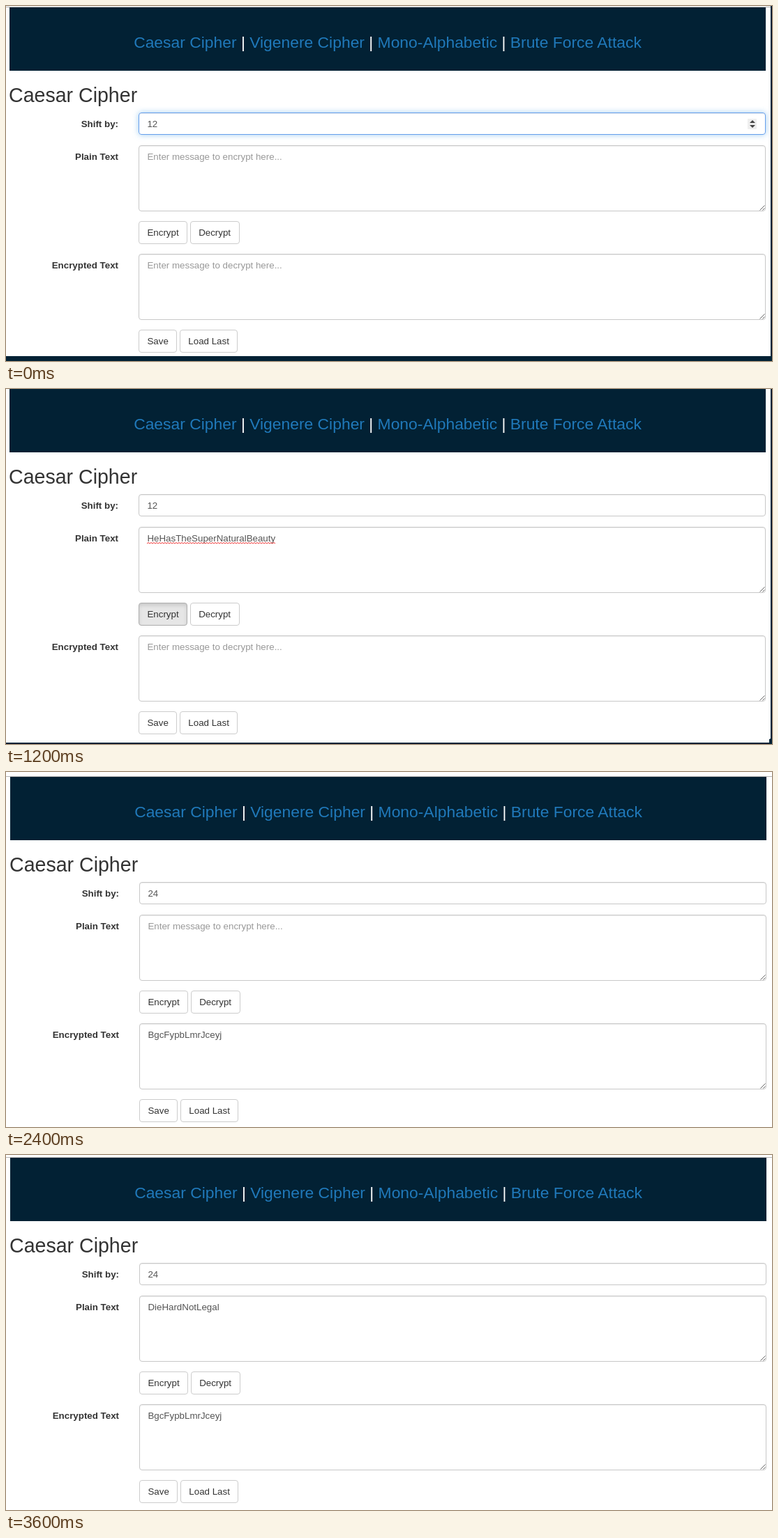
These frames come from a looping animation (1098x510 px, 4200 ms). An HTML page:

```html
<!DOCTYPE html>
<html lang="en">
<head>
<meta charset="utf-8">
<title>Caesar Cipher</title>
<style>
  html, body { margin: 0; width: 100%; height: 100%; overflow: hidden; background: #fff; }
  body { position: relative; font: 13.333px/19px "Liberation Sans", Arial, sans-serif; color: #333; }
  #page { position: absolute; left: 0; top: 0; width: 1098px; height: 510px; }
  #page > *, .edge { position: absolute; box-sizing: border-box; white-space: nowrap; }
  .rule { left: -5px; top: 1px; width: 1110px; height: 1px; background: #b4b4b4; }
  nav { left: 5px; top: 2px; width: 1084px; height: 91px; padding-top: 37px; background: #022134;
        color: #fff; font-size: 22.86px; line-height: 26px; text-align: center; }
  nav a { color: #2079ba; }
  h2 { left: 4px; top: 112px; margin: 0; font-size: 28.57px; font-weight: 400; line-height: 32px; }
  label { left: 0; width: 161px; text-align: right; font-weight: 700; }
  .field { left: 190px; width: 899px; height: 95px; padding: 6px 11.4px; color: #555;
           border: 1px solid #c8c8c8; border-radius: 4px; box-shadow: inset 0 1px 1px rgba(0,0,0,.075); }
  .field.empty { color: #999; }
  #shift { top: 153px; height: 32px; }
  #shift.focus { border-color: #669fec; box-shadow: inset 0 1px 1px rgba(0,0,0,.075), 0 0 8px rgba(102,175,233,.6); }
  .row { left: 190px; height: 33px; }
  .row b { display: inline-block; box-sizing: border-box; height: 33px; padding: 6px 11.43px;
           border: 1px solid #ccc; border-radius: 4px; font-weight: 400; vertical-align: top; }
  .row b.active { background: #e6e6e6; border-color: #adadad; box-shadow: inset 0 3px 5px rgba(0,0,0,.125); }
  #marks { left: 0; top: 0; overflow: visible; }
  .edge { background: #022134; }
  #right { left: 1096px; top: 0; width: 2px; height: 510px; }
  #bottom { left: 0; bottom: 0; width: 1098px; }
  #corner { left: 1094px; top: 501px; width: 4px; height: 9px; clip-path: polygon(100% 0, 100% 100%, 0 100%, 0 25%); }
</style>
</head>
<body>
<div id="page">
  <div class="rule"></div>
  <nav><a>Caesar Cipher</a> | <a>Vigenere Cipher</a> | <a>Mono-Alphabetic</a> | <a>Brute Force Attack</a></nav>
  <h2>Caesar Cipher</h2>
  <label style="top:160px">Shift by:</label>
  <div class="field" id="shift"></div>
  <label style="top:207px">Plain Text</label>
  <div class="field" id="plain" style="top:200px"></div>
  <div class="row" style="top:309px"><b id="encrypt">Encrypt</b> <b id="decrypt">Decrypt</b></div>
  <label style="top:363px">Encrypted Text</label>
  <div class="field" id="cipher" style="top:356px"></div>
  <div class="row" style="top:465px"><b>Save</b> <b>Load Last</b></div>
  <svg id="marks" width="1098" height="510">
    <defs>
      <pattern id="wave" width="4" height="3" patternUnits="userSpaceOnUse" patternTransform="translate(202 222)">
        <path d="M-1 3L2 .5L5 3" fill="none" stroke="#f03030"/>
      </pattern>
      <path id="grip" d="M1080.5 293.5l7-7m-3 7l3-3" stroke="#666" fill="none"/>
    </defs>
    <use href="#grip"/>
    <use href="#grip" y="156"/>
    <rect id="squiggle" x="202" y="222" width="184" height="3" fill="url(#wave)"/>
    <g id="spinner">
      <rect x="1063" y="162" width="13" height="15" rx="1" fill="#efefef"/>
      <path d="M1066 168h8l-4-4zM1066 171h8l-4 4z" fill="#444"/>
    </g>
  </svg>
</div>
<div class="edge" id="right"></div>
<div class="edge" id="bottom"></div>
<div class="edge" id="corner"></div>
<script>
  const HOLD = 600;
  const el = id => document.getElementById(id);

  const caesar = (text, shift) => text.replace(/[a-z]/gi, c => {
    const base = c < 'a' ? 65 : 97;
    return String.fromCharCode((c.charCodeAt(0) - base + shift) % 26 + base);
  });

  const first = 'HeHasTheSuperNaturalBeauty';
  const second = 'DieHardNotLegal';
  const firstCode = caesar(first, 12);
  const secondCode = caesar(second, 24);

  const scenes = [
    { x: 0, y: 0, shift: 12, focus: true, bottom: 7, right: true },
    { x: -2, y: 2, shift: 12, plain: first, misspelt: true, bottom: 2, right: true, corner: true },
    { x: 0, y: -2, shift: 12, plain: first, misspelt: true, press: 'encrypt', bottom: 2, right: true, corner: true },
    { x: 1, y: -1, shift: 12, plain: first, cipher: firstCode, bottom: 2, corner: true },
    { x: 1, y: 5, shift: 24, cipher: secondCode },
    { x: 1, y: 2, shift: 24, cipher: secondCode, press: 'decrypt' },
    { x: 1, y: 2, shift: 24, plain: second, cipher: secondCode }
  ];

  const show = (id, on) => { el(id).style.display = on ? '' : 'none'; };

  function fill(id, text, hint) {
    el(id).textContent = text || hint;
    el(id).classList.toggle('empty', !text);
  }

  function render(s) {
    el('page').style.transform = `translate(${s.x}px, ${s.y}px)`;
    el('shift').textContent = s.shift;
    el('shift').classList.toggle('focus', !!s.focus);
    fill('plain', s.plain, 'Enter message to encrypt here...');
    fill('cipher', s.cipher, 'Enter message to decrypt here...');
    for (const id of ['encrypt', 'decrypt']) el(id).classList.toggle('active', s.press === id);
    show('spinner', s.focus);
    show('squiggle', s.misspelt);
    show('right', s.right);
    show('corner', s.corner);
    el('bottom').style.height = (s.bottom || 0) + 'px';
  }

  let start, current;
  function tick(now) {
    start ??= now;
    const scene = scenes[Math.floor((now - start) / HOLD) % scenes.length];
    if (scene !== current) render(current = scene);
    requestAnimationFrame(tick);
  }
  render(current = scenes[0]);
  requestAnimationFrame(tick);
</script>
</body>
</html>
```
